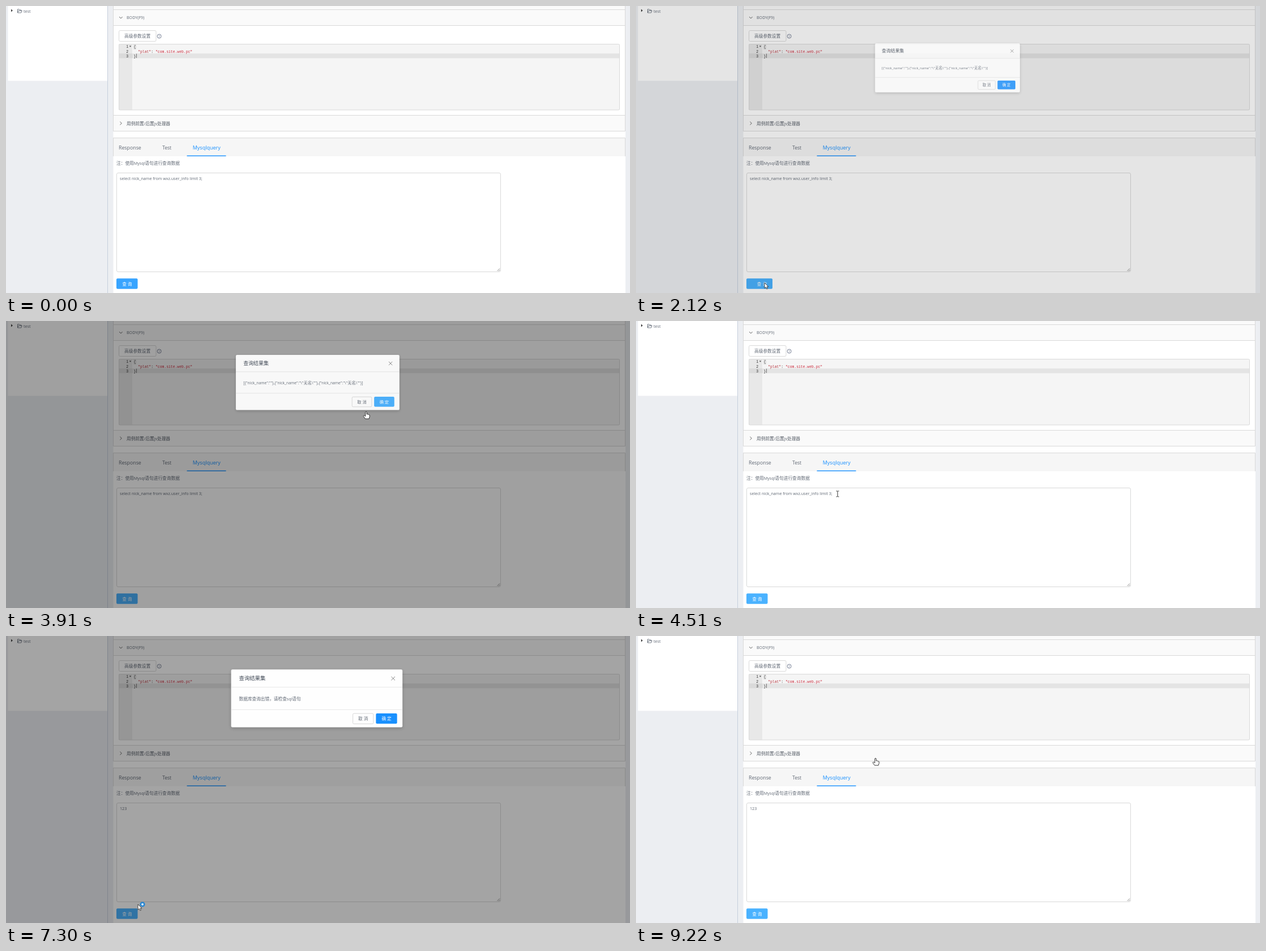
An HTML page that plays this animation: 1102 px wide and 508 px high, repeating every 9.29 s.

```html
<!DOCTYPE html>
<html lang="zh">
<head>
<meta charset="utf-8">
<style>
  html, body { margin: 0; width: 100%; height: 100%; overflow: hidden; background: #fff; }
  svg { display: block; width: 1102px; height: 508px; }
  text { font-family: "Open Sans", "Noto Sans CJK SC", "Noto Sans CJK", sans-serif; white-space: pre; }
  .code { font-family: "Liberation Mono", "DejaVu Sans Mono", monospace; }
</style>
</head>
<body>
<svg id="stage" viewBox="0 0 1102 508" xmlns="http://www.w3.org/2000/svg">
  <defs>
    <filter id="shadow" x="-10%" y="-20%" width="120%" height="150%">
      <feDropShadow dx="0" dy="2" stdDeviation="3" flood-opacity=".2"/>
    </filter>
  </defs>
  <g id="page"></g>
  <rect id="mask" width="1102" height="508"/>
  <g id="modal"></g>
  <g id="pointer">
    <path id="arrow" d="M0 0V9.6L2.3 7.5 3.9 11 5.5 10.3 4 6.9H7Z" fill="#fff" stroke="#222" stroke-width=".8"/>
    <g id="ring">
      <circle cx="8" cy="-5" r="3.3" fill="#d9efff" stroke="#2b87d1" stroke-width="2.6"/>
    </g>
    <path id="hand" d="M-1.2 1Q0 -.7 1.1 1V5Q2.2 4.2 3 5.2 4.1 4.6 4.7 5.8 6 5.3 6.2 6.8V9.5L5 13H-1.5L-4.8 8.5Q-5 7-3.4 7.2L-1.2 8.6Z"
      fill="#fff" stroke="#222" stroke-width=".9" stroke-linejoin="round"/>
    <path id="ibeam" d="M-2.5 -5H-.6L0 -4.4 .6 -5H2.5M0 -4.4V4.4M-2.5 5H-.6L0 4.4 .6 5H2.5" fill="none" stroke="#333"/>
  </g>
</svg>
<script>
const LOOP = 9290;
const NS = 'http://www.w3.org/2000/svg';
const BLUE = '#1890ff', HOVER = '#47b0ff', INK = '#626a76', LINE = '#d9d9d9';
const $ = id => document.getElementById(id);
const page = $('page'), modal = $('modal');

function add(parent, tag, attrs) {
  const node = document.createElementNS(NS, tag);
  set(node, attrs);
  return parent.appendChild(node);
}

function set(node, attrs) {
  for (const key in attrs) node.setAttribute(key, attrs[key]);
}

const show = (node, on) => node.setAttribute('visibility', on ? 'inherit' : 'hidden');

function rect(parent, x, y, width, height, fill, extra) {
  return add(parent, 'rect', { x, y, width, height, fill, ...extra });
}

function line(parent, d, stroke = LINE, extra) {
  return add(parent, 'path', { d, stroke, fill: 'none', ...extra });
}

// Latin runs are set slightly smaller than the Chinese ones.
function fillText(node, content, size) {
  node.textContent = '';
  for (const run of content.match(/[\x20-\x7e]+|[^\x20-\x7e]+/g) || []) {
    const latin = /[\x20-\x7e]/.test(run);
    add(node, 'tspan', { 'font-size': latin ? size * 0.928 : size }).textContent = run;
  }
}

function label(parent, x, y, content, extra = {}, size = 7.7) {
  const node = add(parent, 'text', { x, y, fill: INK, ...extra });
  fillText(node, content, size);
  return node;
}

function code(x, y, content, fill = '#333', extra) {
  const node = add(page, 'text', { x, y, fill, class: 'code', 'font-size': 6.4, ...extra });
  node.textContent = content;
}

function button(parent, x, y, width, content, fill, ink, stroke = 'none') {
  const box = rect(parent, x, y, width, 18.5, fill, { rx: 2, stroke });
  const text = label(parent, x + width / 2, y + 12.2, content, { fill: ink, 'text-anchor': 'middle' });
  return { box, text };
}

// Side tree
rect(page, 0, 0, 189.5, 508, '#eceef2');
rect(page, 1094, 0, 8, 508, '#eceef2');
rect(page, 3.5, 0, 175.5, 132.5, '#fff');
line(page, 'M179.5 0V508', '#c6cfdd');
add(page, 'path', { d: 'M9 5.5L12 8 9 10.5Z', fill: '#444' });
line(page, 'M20.5 12V5.8H23.3L24.2 7H26.8V8.4M20.5 12L22 8.4H28.2L26.8 12Z', '#555e6b', { 'stroke-width': .8 });
label(page, 31, 11.7, 'test');

// Collapsible panels
rect(page, 190, 0, 903, 34, '#fafafa');
rect(page, 190, 194, 903, 27, '#fafafa');
line(page, 'M189.5 0V221.5H1093.5V0M189.5 6.5H1093.5M189.5 34.5H1093.5M189.5 193.5H1093.5');
line(page, 'M200 19L202.8 22 205.6 19M201.3 204.8L204.3 207.6 201.3 210.4', '#555', { 'stroke-width': .9 });
label(page, 213, 23.4, 'BODY(F9)');
label(page, 213, 210.5, '用例前置/后置js处理器', { fill: '#555c66' });
rect(page, 199.5, 43.5, 65.5, 19, '#fff', { rx: 2, stroke: LINE });
label(page, 209, 56.1, '高级参数设置');
add(page, 'circle', { cx: 270.6, cy: 53.5, r: 3.5, fill: 'none', stroke: '#56617c', 'stroke-width': .8 });
label(page, 270.6, 55.7, '?', { 'text-anchor': 'middle', fill: '#56617c' }, 6.3);

// Code editor
rect(page, 199, 67.5, 885, 116.5, '#f5f5f5');
rect(page, 199, 67.5, 24, 116.5, '#e8e8e8');
rect(page, 199, 84, 24, 8.4, '#dadada');
rect(page, 223, 84, 861, 8.4, '#e4e4e4');
rect(page, 199.5, 67.5, 884, 116.5, 'none', { rx: 2, stroke: LINE });
[1, 2, 3].forEach(n => code(216, 66.3 + n * 8.15, n, '#333', { 'text-anchor': 'end' }));
add(page, 'path', { d: 'M217.8 70.6H221.2L219.5 72.8Z', fill: '#444' });
rect(page, 225.5, 69, 4, 7, 'none', { stroke: '#c8c8c8', 'stroke-width': .6 });
code(225.5, 74.4, '{');
code(233.2, 82.5, '"plat"', '#b5323c');
code(256.3, 82.5, ':');
code(264, 82.5, '"com.site.web.pc"', '#c9283a');
code(225.5, 90.7, '}');
line(page, 'M230.5 84.5V92', '#555', { 'stroke-width': .8 });

// Result tabs
rect(page, 190, 234, 903, 32, '#f6f6f6');
line(page, 'M189.5 266V233.5H1093.5V266');
label(page, 199, 253.8, 'Response', {}, 9.5);
label(page, 276, 253.8, 'Test', {}, 9.3);
label(page, 329.7, 253.8, 'Mysqlquery', { fill: BLUE, 'font-weight': 500 }, 9.7);
rect(page, 319.5, 264.6, 69, 1.4, BLUE);
label(page, 195, 281.3, '注：使用Mysql语句进行查询数据');

// Query form
const QUERY = 'select nick_name from wxz.user_info limit 3;';
const glow = rect(page, 194.7, 294.7, 679.5, 176.5, 'none', { rx: 3, stroke: '#d1e9ff', 'stroke-width': 1.4 });
const area = rect(page, 195.5, 295.5, 678, 175, '#fff', { rx: 2.5 });
line(page, 'M867.5 469L872 464.5M870 469.3L872.3 467', '#777', { 'stroke-width': .8 });
const query = label(page, 201, 308.1, QUERY);
const caret = line(page, 'M0 301V310', '#444', { 'stroke-width': .7 });
const clipRect = rect(add($('stage').querySelector('defs'), 'clipPath', { id: 'selected' }), 0, 300, 0, 11, '#000');
const marked = add(page, 'g', { 'clip-path': 'url(#selected)' });
rect(marked, 201, 300, 146.5, 11, BLUE);
label(marked, 201, 308.1, QUERY, { fill: '#fff' });
const run = button(page, 195, 482.3, 37.5, '查 询', HOVER, '#fff');

// Dialog
rect(modal, 398.5, 57, 304, 102.8, '#fff', { rx: 2.3, filter: 'url(#shadow)' });
line(modal, 'M398.5 88.5H702.5M398.5 128.5H702.5', '#e8e8e8');
label(modal, 412.5, 76.2, '查询结果集', { fill: '#3f4855', 'font-weight': 500 }, 9.4);
line(modal, 'M682.7 69.7L689.3 76.3M689.3 69.7L682.7 76.3', '#777', { 'stroke-width': .9 });
const message = label(modal, 412.5, 111.6, ' ');
button(modal, 614.5, 135.3, 36.5, '取 消', '#fff', INK, LINE);
const ok = button(modal, 655.5, 135.1, 37.5, '确 定', BLUE, '#fff');

const RESULT = '[{"nick_name":""},{"nick_name":"\\"无名\\""},{"nick_name":"\\"无名\\""}]';
const FAILURE = '数据库查询出错，请检查sql语句';
const dialogs = [
  { open: 2057, close: 3850, hover: 3390, ox: 548, oy: 115, text: RESULT },
  { open: 7072, close: 8600, hover: 8370, ox: 235, oy: 492, text: FAILURE },
];

// Pointer stops: time, x, y
const track = [
  [70, 1061, 440], [300, 880, 415], [700, 270, 462], [850, 146, 492], [970, 205, 488],
  [1170, 205, 488], [1510, 227, 490], [2130, 227, 490], [2580, 493, 237], [2650, 500, 230],
  [3120, 606, 186], [3440, 663, 146], [3860, 663, 146], [4440, 356, 306], [4700, 356, 306],
  [5300, 191, 311], [5510, 191, 311], [5770, 308, 320], [6560, 308, 320], [6880, 226, 488],
  [7040, 226, 488], [7240, 233, 475], [7400, 233, 475], [7900, 480, 290], [8290, 687, 146],
  [8600, 686, 146], [9190, 423, 216], [LOOP, 423, 216],
];

const clamp = v => Math.min(1, Math.max(0, v));
const ramp = (t, start, length) => clamp((t - start) / length);
const within = (t, a, b) => t >= a && t < b;
const mix = (a, b, k) => a + (b - a) * k;

function blend(from, to, k) {
  const part = (hex, i) => parseInt(hex.slice(i, i + 2), 16);
  return `rgb(${[1, 3, 5].map(i => Math.round(mix(part(from, i), part(to, i), k)))})`;
}

function bezier(x1, y1, x2, y2) {
  const curve = (u, a, b) => 3 * (1 - u) ** 2 * u * a + 3 * (1 - u) * u * u * b + u ** 3;
  return x => {
    let low = 0, high = 1;
    for (let i = 0; i < 24; i++) {
      const u = (low + high) / 2;
      if (curve(u, x1, x2) < x) low = u; else high = u;
    }
    return curve(low, y1, y2);
  };
}
const zoomIn = bezier(.08, .82, .17, 1);
const zoomOut = bezier(.78, .14, .15, .86);

function pointerAt(t) {
  const i = Math.max(1, track.findIndex(stop => stop[0] > t));
  const [t0, x0, y0] = track[i - 1], [t1, x1, y1] = track[i];
  const k = clamp((t - t0) / (t1 - t0));
  return { x: mix(x0, x1, k), y: mix(y0, y1, k) };
}

function drawPointer(t, { x, y }) {
  const hand = within(t, 930, 1400) || within(t, 3390, 3950) || within(t, 6860, 7040) || t >= 8240;
  const beam = !hand && (within(t, 250, 760) || within(t, 4380, 6860));
  show($('pointer'), t >= 70 && !within(t, 6040, 6560));
  set($('pointer'), { transform: `translate(${x} ${y})` });
  show($('hand'), hand);
  show($('ibeam'), beam);
  show($('arrow'), !hand && !beam);
  show($('ring'), within(t, 2250, 3390) || within(t, 7200, 8240));
  // The ring sits beside the arrow tip, level with it.
  set($('ring'), { transform: 'translate(0 5)' });
}

function drawForm(t, { x }) {
  const typed = t < 5910 ? QUERY : '123'.slice(0, t < 6240 ? 1 : t < 6440 ? 2 : 3);
  if (query.dataset.value !== typed) {
    query.dataset.value = typed;
    fillText(query, typed, 7.7);
  }
  const focused = within(t, 4580, 6950);
  const hovered = within(t, 4510, 6950) ? ramp(t, 4510, 200)
    : t < 1000 ? Math.min(ramp(t, 270, 200), 1 - ramp(t, 720, 200)) : 1 - ramp(t, 6950, 200);
  set(area, { stroke: blend(LINE, '#40a9ff', t > 1000 && t < 4510 ? 0 : hovered) });
  show(glow, focused);
  show(caret, within(t, 5910, 6900));
  set(caret, { transform: `translate(${201.5 + typed.length * 4.1} 0)` });

  const left = Math.max(201, x);
  const selecting = within(t, 4700, 5910);
  set(clipRect, { x: t < 5300 ? left : 201, width: !selecting ? 0 : t < 5300 ? Math.max(0, 347.5 - left) : 146.5 });

  const loading = within(t, 1400, 2350) || within(t, 6960, 7190);
  const active = t < 4580 ? ramp(t, 930, 200) : t < 6000 ? 1 - ramp(t, 4580, 250) : ramp(t, 6860, 200);
  set(run.box, { width: loading ? 46 : 37.5, fill: blend('#38a4ff', '#4ab2ff', active) });
  set(run.text, { x: loading ? 222.5 : 213.8 });
}

function drawDialog(t) {
  const d = dialogs.find(item => within(t, item.open, item.close + 300));
  show(modal, d);
  show($('mask'), d);
  if (!d) return;
  const enter = ramp(t, d.open, 300), leave = ramp(t, d.close, 300);
  const shown = leave > 0 ? 1 - zoomOut(leave) : zoomIn(enter);
  const scale = mix(.2, 1, shown);
  set($('mask'), { opacity: .47 * (leave > 0 ? 1 - leave : enter) });
  set(modal, {
    opacity: shown,
    transform: `translate(${d.ox} ${d.oy}) scale(${scale}) translate(${-d.ox} ${-d.oy})`,
  });
  if (message.dataset.value !== d.text) {
    message.dataset.value = d.text;
    fillText(message, d.text, 7.7);
  }
  set(ok.box, { fill: blend(BLUE, HOVER, ramp(t, d.hover, 200)) });
}

function draw(t) {
  const pointer = pointerAt(t);
  drawForm(t, pointer);
  drawDialog(t);
  drawPointer(t, pointer);
}

const start = performance.now();
function tick() {
  draw((performance.now() - start) % LOOP);
  requestAnimationFrame(tick);
}
draw(0);
requestAnimationFrame(tick);
</script>
</body>
</html>
```
